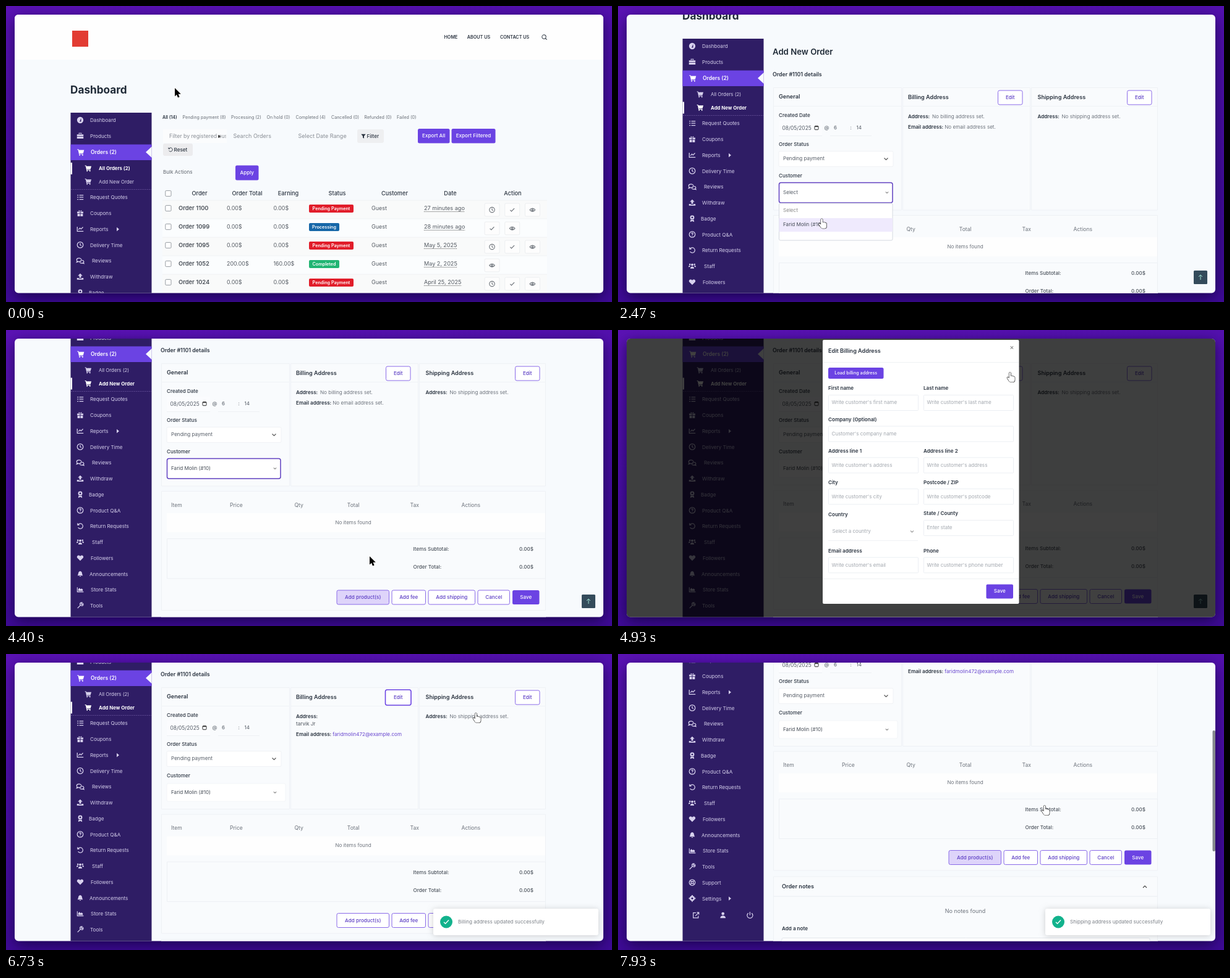
Animation, 980 px wide and 480 px high, one loop 8 s. Source, as an HTML page with a canvas:

```html
<!DOCTYPE html>
<html lang="en">
<head>
<meta charset="utf-8">
<title>Add new order</title>
<style>
html, body { margin: 0; width: 100%; height: 100%; overflow: hidden; background: #4a0ea3; }
canvas { display: block; width: 980px; height: 480px; }
</style>
</head>
<body>
<canvas id="stage" width="980" height="480"></canvas>
<script>
const ctx = document.getElementById('stage').getContext('2d');
const LOOP = 8000;
const PURPLE = '#6b43e3', NAVY = '#2f1d65', INK = '#2b3440', GREY = '#6d737c', PAGE = '#f7fafd';
const CUSTOMER = 'Farid Molin (#10)', FIRST = 'tarvik', EMAIL = 'faridmolin472@example.com';

// Time tracks: [time, value...]
const cursorKeys = [[0, 273, 133], [520, 180, 284], [1150, 180, 284], [1400, 227, 260], [1750, 345, 380],
  [2080, 352, 303], [2250, 352, 303], [2550, 325, 354], [3000, 325, 354], [3400, 390, 268], [3900, 575, 410],
  [4000, 575, 410], [4280, 577, 430], [4400, 588, 367], [4720, 634, 69], [4950, 634, 69], [5200, 385, 69],
  [5400, 385, 69], [5640, 620, 417], [6280, 620, 417], [6730, 760, 96], [6880, 843, 69], [7000, 843, 69],
  [7180, 385, 69], [7270, 385, 69], [7430, 620, 417], [7690, 620, 417], [7930, 690, 246], [8000, 690, 240]];
const scrollKeys = [[0, 0], [1650, 0], [1950, 120], [3020, 120], [3400, 218], [4000, 218], [4250, 198],
  [7700, 198], [7930, 300]];
const handTimes = [[380, 1500], [2400, 3000], [3850, 4340], [4680, 5000], [5130, 5450], [5580, 8000]];
const hoverTimes = [[3850, 4450], [6100, 6380], [7600, 8000]];

const within = (t, ranges) => ranges.some(([a, b]) => t >= a && t < b);

function track(keys, t) {
  let i = 0;
  while (i < keys.length - 1 && keys[i + 1][0] <= t) i++;
  const a = keys[i], b = keys[i + 1];
  if (!b || t <= a[0]) return a.slice(1);
  const p = (t - a[0]) / (b[0] - a[0]), e = p * p * (3 - 2 * p);
  return a.slice(1).map((v, k) => v + (b[k + 1] - v) * e);
}

function text(str, x, y, { size = 8.1, color = INK, weight = 400, align = 'left' } = {}) {
  ctx.font = `${weight} ${size}px Inter, sans-serif`;
  ctx.textAlign = align;
  ctx.textBaseline = 'middle';
  ctx.fillStyle = color;
  ctx.fillText(str, x, y);
}

function box(x, y, w, h, fill, stroke, r = 0, lw = 1) {
  ctx.beginPath();
  ctx.roundRect(x, y, w, h, r);
  if (fill) { ctx.fillStyle = fill; ctx.fill(); }
  if (stroke) { ctx.strokeStyle = stroke; ctx.lineWidth = lw; ctx.stroke(); }
}

function stroke(points, color, lw = 1) {
  ctx.beginPath();
  points.forEach(([x, y]) => ctx.lineTo(x, y));
  ctx.strokeStyle = color;
  ctx.lineWidth = lw;
  ctx.stroke();
}

const rule = (x1, x2, y, color = '#e9edf2') => stroke([[x1, y], [x2, y]], color);
const chevron = (x, y, s = 2.6, color = '#555', dir = 1) =>
  stroke([[x - s, y - dir * s / 2], [x, y + dir * s / 2], [x + s, y - dir * s / 2]], color, 1.1);

function shape(points, fill) {
  ctx.beginPath();
  points.forEach(([x, y]) => ctx.lineTo(x, y));
  ctx.closePath();
  ctx.fillStyle = fill;
  ctx.fill();
}

function button(label, x, y, w, h, { solid = true, hot = false, ring = false, size = 8.1 } = {}) {
  const fill = solid ? PURPLE : hot ? '#ded4fa' : '#fff';
  if (ring) box(x - 1, y - 1, w + 2, h + 2, fill, PURPLE, 3, 1.6);
  else box(x, y, w, h, fill, solid ? null : '#8a6be8', 2.5);
  text(label, x + w / 2, y + h / 2 + .3, { size, color: solid ? '#fff' : '#5d3fc4', weight: 500, align: 'center' });
}

// Icons live in a box of about 12 units; "s" is stroked, "f" is filled.
const circle = (x, y, r) => `M${x - r} ${y}a${r} ${r} 0 1 0 ${2 * r} 0a${r} ${r} 0 1 0 ${-2 * r} 0z`;
const icons = {
  gauge: ['f', circle(0, 0, 5.4) + 'M-1 2.5L1.5-3.5 1.6 2.5z'],
  bag: ['f', 'M-5.5-2.5h11v3h-11zM-5.5 1.3h11v3.4h-11zM-2.5-3v-2h5v2h-1v-1h-3v1z'],
  cart: ['f', 'M-6-5h2.2l.4 1.4h9L4 2H-2.2l.2.8h6v1h-7L-4.7-4H-6z' + circle(-2, 5, 1) + circle(3, 5, 1)],
  list: ['s', 'M-5-3.5h2M-1.5-3.5h7M-5 0h2M-1.5 0h7M-5 3.5h2M-1.5 3.5h7'],
  gift: ['f', 'M-5.2-2.5h4.7V.2h-4.7zM.5-2.5h4.7V.2H.5zM-4.6 1h4.1v4.2h-4.1zM.5 1h4.1v4.2H.5zM0-3C-5-3-2-7 0-3 2-7 5-3 0-3z'],
  chart: ['s', 'M-5-4v8H5.5M-3 1l2.5-2.6 2 1.6L4.8-3.4'],
  clock: ['s', circle(0, 0, 5) + 'M0-3V0l2 1.4'],
  chat: ['s', 'M-6-1.5a4 3 0 1 1 8 0a4 3 0 1 1-8 0M3.2-.8c4 .6 3 3.4 2.2 3.9l.9 1.6-2.6-.7C1 4.5-.3 3.4-.8 2.5M-5 .5l-1 2 2.6-.9'],
  upload: ['f', 'M0-5.5l4 4H1.5V2h-3v-3.5H-4zM-5.5 2.2h3v1h5v-1h3V5h-11z'],
  badge: ['f', circle(0, -1.8, 3.6) + circle(0, -1.8, 1.5) + 'M-2.6 2l-.8 3.8L0 4.4l3.4 1.4L2.6 2 0 2.6z'],
  help: ['s', circle(0, 0, 5) + 'M-1.4-1.3c.2-2 3-1.6 2.7.2C1.1 0 0 0 0 1.3M0 2.5v.8'],
  undo: ['s', 'M-3.6-2.4a4.4 4.4 0 1 1 0 4.6M-4.4-5v3h3'],
  staff: ['f', circle(0, -2.4, 2) + circle(-4, -3, 1.4) + circle(4, -3, 1.4) + 'M-3.2 4.2C-3.2-.4 3.2-.4 3.2 4.2zM-6.3 1.5c0-3 2.6-3 3-2.2l-1 2.2zM6.3 1.5c0-3-2.6-3-3-2.2l1 2.2z'],
  heart: ['f', 'M0 5L-5 0C-7-4-2-6 0-2.8 2-6 7-4 5 0z'],
  bell: ['f', 'M-4.6 3c2-2 .6-7 4.6-7.6C4-4 2.6 1 4.6 3zM-1.3 3.8h2.6c-.3 1.6-2.3 1.6-2.6 0z'],
  area: ['f', 'M-5.5-4h1.2v7.2h10v1.2H-5.5zM-3.4 2.3v-3l2-2.3 2 2 1.8-1 2 1.6v2.7z'],
  wrench: ['s', 'M-4.5 4.5L.8-.8M4.8-3.4l-1.7 1.6-1.5-1.5L3.3-5C-.6-6-1.6-1.4.8-.8 3 1.5 6 0 4.8-3.4z'],
  ring: ['s', circle(0, 0, 5) + circle(0, 0, 2) + 'M-3.5-3.5l2 2M3.5-3.5l-2 2M-3.5 3.5l2-2M3.5 3.5l-2-2'],
  gear: ['f', circle(0, 0, 4.2) + circle(0, 0, 1.7) + 'M-1.3-4h2.6l-.3-1.7h-2zM-1.3 4h2.6L1 5.7h-2zM-4-1.3v2.6L-5.7 1v-2zM4-1.3v2.6L5.7 1v-2z'],
  link: ['s', 'M0-4h-4.5v8.5h8.5V1M1.5-4.5H5V-1M5-4.5L-1 1.4'],
  user: ['f', circle(0, -2.6, 2.5) + 'M-4.6 5C-4.6-.6 4.6-.6 4.6 5z'],
  power: ['s', 'M-2.8-3.5a4.8 4.8 0 1 0 5.6 0M0-5.5V0'],
  eye: ['s', 'M-5 0C-2.5-4 2.5-4 5 0 2.5 4-2.5 4-5 0z' + circle(0, 0, 1.5)],
  check: ['s', 'M-4 .2l2.6 2.6L4-3'],
  search: ['s', circle(-.6, -.6, 4) + 'M2.3 2.3L5.3 5.3'],
  funnel: ['f', 'M-5-4.5H5L1.3 0v5L-1.3 3.4V0z']
};
for (const name in icons) icons[name][1] = new Path2D(icons[name][1]);

function icon(name, x, y, color = '#d8d2ee', scale = .95) {
  const [mode, path] = icons[name];
  ctx.save();
  ctx.translate(x, y);
  ctx.scale(scale, scale);
  ctx.lineWidth = 1.3;
  ctx.fillStyle = ctx.strokeStyle = color;
  if (mode === 's') ctx.stroke(path); else ctx.fill(path, 'evenodd');
  ctx.restore();
}

const menu = [['list', 'Request Quotes', 136], ['gift', 'Coupons', 136], ['chart', 'Reports', 136],
  ['clock', 'Delivery Time', 136], ['chat', 'Reviews', 139], ['upload', 'Withdraw', 136], ['badge', 'Badge', 134],
  ['help', 'Product Q&A', 136], ['undo', 'Return Requests', 136], ['staff', 'Staff', 139], ['heart', 'Followers', 137],
  ['bell', 'Announcements', 135], ['area', 'Store Stats', 137], ['wrench', 'Tools', 136], ['ring', 'Support', 136],
  ['gear', 'Settings', 136]];

function sidebar(adding) {
  const soft = '#d5cfeb';
  const arrow = y => shape([[179, y - 3.2], [183, y], [179, y + 3.2]], soft);
  box(104.5, 173, 131, 900, NAVY);
  icon('gauge', 120, 185);
  text('Dashboard', 136, 186, { color: soft });
  icon('bag', 120, 210.5);
  text('Products', 136, 211.5, { color: soft });
  box(104.5, 224.5, 131, 25.5, PURPLE);
  shape([[235.7, 228], [226, 237], [235.7, 246]], PAGE);
  icon('cart', 121, 237, '#fff');
  text('Orders (2)', 137, 237.3, { size: 8.5, color: '#fff', weight: 600 });
  [['All Orders (2)', 264, !adding], ['Add New Order', 285.5, adding]].forEach(([label, y, on]) => {
    icon('cart', 133, y - 1, on ? '#fff' : soft, .9);
    text(label, 150, y, { size: 7.8, color: on ? '#fff' : soft, weight: on ? 700 : 400 });
    if (on) box(104.5, y - 10, 2.5, 19, '#fff');
  });
  ctx.setLineDash([2, 1]);
  rule(105, 235, 297.5, '#5b468f');
  ctx.setLineDash([]);
  menu.forEach(([name, label, x], i) => {
    const y = 311 + i * 25.74;
    icon(name, 120, y - .8);
    text(label, x, y, { color: soft });
  });
  arrow(362);
  arrow(696.5);
  ['link', 'user', 'power'].forEach((name, i) => icon(name, 126 + i * 43.7, 723.5));
}

function header() {
  box(14, 0, 952, 87, '#fefefe');
  box(107, 40, 26, 26, '#e23c33');
  const nav = { size: 7.2, weight: 600 };
  text('HOME', 708.5, 50.5, nav);
  text('ABOUT US', 745.8, 50.5, nav);
  text('CONTACT US', 799, 50.5, nav);
  icon('search', 870.5, 50.5, '#303a45', .8);
  text('Dashboard', 104, 136.5, { size: 17.2, color: '#1f2a37', weight: 700 });
}

const tabs = [['All (14)', 253], ['Pending payment (8)', 285.5], ['Processing (2)', 364], ['On hold (0)', 421.5],
  ['Completed (4)', 468.5], ['Cancelled (0)', 526], ['Refunded (0)', 579.5], ['Failed (0)', 632]];
const columns = [['Order', 313], ['Order Total', 390], ['Earning', 456.5], ['Status', 535.5], ['Customer', 628.5],
  ['Date', 718.5], ['Action', 819.5]];
const statuses = { p: ['Pending Payment', 72, '#e11d2a'], r: ['Processing', 49, '#1667a8'], c: ['Completed', 49, '#22b573'] };
const orders = [[1100, '0.00$', '0.00$', 'p', '27 minutes ago'], [1099, '0.00$', '0.00$', 'r', '28 minutes ago'],
  [1095, '0.00$', '0.00$', 'p', 'May 5, 2025'], [1052, '200.00$', '160.00$', 'c', 'May 2, 2025'],
  [1024, '0.00$', '0.00$', 'p', 'April 25, 2025']];
const actions = { p: ['clock', 'check', 'eye'], r: ['check', 'eye'], c: ['eye'] };

function ordersPage() {
  tabs.forEach(([label, x], i) =>
    text(label, x, 181.3, { size: 7.1, color: i ? '#666c74' : INK, weight: i ? 400 : 600 }));
  const hint = { size: 9, color: '#888d94' };
  box(254, 200, 103, 22, '#fbfcfd');
  ctx.save();
  ctx.beginPath();
  ctx.rect(254, 200, 102, 22);
  ctx.clip();
  text('Filter by registered customer', 264, 211.3, { ...hint, size: 8.7 });
  ctx.restore();
  shape([[343, 209], [348, 211.5], [343, 214]], '#444');
  text('Search Orders', 367.5, 211.3, hint);
  text('Select Date Range', 472.5, 211.3, hint);
  box(568, 200, 43, 22, '#eeeff1', null, 3);
  icon('funnel', 578, 211, INK, .75);
  text('Filter', 583.5, 211.3, { weight: 500 });
  box(254, 223, 48, 20, '#ececee', null, 3);
  icon('undo', 266, 233, INK, .7);
  text('Reset', 271.5, 233.5, { weight: 500 });
  button('Export All', 666, 199, 51.5, 23.5);
  button('Export Filtered', 720.5, 199, 71, 23.5);
  text('Bulk Actions', 254, 269.5, { color: '#5f656d' });
  button('Apply', 371, 258.5, 37.5, 24);

  columns.forEach(([label, x]) => text(label, x, 304, { size: 9.2, weight: 500, align: 'center' }));
  const check = y => box(257.8, y - 4.6, 9.2, 9.2, '#fff', '#8d9299', 1.5, .9);
  check(304);
  orders.forEach(([id, total, earn, state, date], i) => {
    const y = 328 + i * 30;
    box(253, y - 13, 622, 30, i % 2 ? '#fbfdfe' : '#f9fafa');
    rule(253, 875, y - 13, '#f0f2f4');
    check(y);
    text(`Order ${id}`, 279, y, { size: 9.4, weight: 600, color: '#4a5058' });
    text(total, 357, y, { size: 8.9, color: '#555b63' });
    text(earn, 432.5, y, { size: 8.9, color: '#555b63' });
    const [label, w, color] = statuses[state];
    box(490, y - 6, w, 13, color, null, 2);
    text(label, 490 + w / 2, y + .8, { size: 7.2, color: '#fff', weight: 600, align: 'center' });
    text('Guest', 591, y, { size: 9, color: '#555b63' });
    text(date, 676, y, { size: 9.1, color: '#555b63' });
    const end = 676 + ctx.measureText(date).width;
    ctx.setLineDash([1, 1]);
    rule(676, end, y + 5.5, '#555');
    ctx.setLineDash([]);
    actions[state].forEach((name, k) => {
      box(774 + k * 32.7, y - 8, 24, 21, '#fdfdfd', '#eceef0', 2);
      icon(name, 786 + k * 32.7, y + 2.6, '#6b7178', .85);
    });
  });
}

function address(label, x, empty, name) {
  const w = 37.5;
  text(label + ':', x, 300, { weight: 600 });
  if (name) text(name + ' Jr', x, 312, { color: '#4b525b' });
  else text(empty, x + w + 1.5, 300, { color: GREY });
}

function orderForm(s) {
  text('Add New Order', 250, 195.3, { size: 13.2, weight: 600, color: '#1f2a37' });
  text('Order #1101 details', 250, 231, { size: 8.8, weight: 600 });
  const grow = s.focus ? 1.5 : 0;
  const head = { size: 9.1, weight: 600 }, label = { weight: 500 }, value = { color: '#555c66' };
  [[251.5, 207], [460.5, 206], [668.5, 204]].forEach(([x, w]) => {
    box(x, 252.5, w, 197 + grow, '#f9fbfd', '#eef1f5');
    rule(x, x + w, 282.5, '#f0f3f6');
  });
  text('General', 260, 267.5, head);
  text('Created Date', 260, 297.3, label);
  box(260, 306, 70, 24, '#fbfcfe');
  text('08/05/2025', 265.5, 318, { ...value, size: 8.4 });
  box(318, 314.6, 6, 6, null, '#333', 1);
  rule(318, 324, 315.5, '#333');
  text('@', 333.5, 318, value);
  text('6', 349, 318, value);
  text(':', 375.5, 318, value);
  text('14', 385.5, 318, value);
  rule(260, 330, 330.5, '#eef1f4');
  rule(343, 410, 330.5, '#eef1f4');
  text('Order Status', 260, 345, label);
  box(260, 355.5, 185, 25, '#fff', '#f0f2f5', 2);
  text('Pending payment', 267, 368, value);
  chevron(433.5, 368, 3);
  text('Customer', 260, 395.3, label);
  if (s.focus) box(260.5, 406.5, 183.5, 32.5, '#fff', '#5f3fc0', 3, 1.5);
  else box(260, 408, 192, 29, '#fff', '#f3f5f8', 2);
  text(s.picked ? CUSTOMER : 'Select', 267, 422.4 + grow / 3, { color: s.picked ? '#444b55' : '#555c66' });
  chevron(435, 422.4, 2.2, '#888');

  text('Billing Address', 469, 268.3, head);
  text('Shipping Address', 678.5, 268.3, head);
  button('Edit', 614.5, 257, 39.5, 23, { solid: false, ring: s.editRing });
  button('Edit', 823.5, 257, 39.5, 23, { solid: false });
  address('Address', 469, 'No billing address set.', s.billed && FIRST);
  address('Address', 678.5, 'No shipping address set.', s.shipped && FIRST);
  const my = s.billed ? 328.4 : 316.6;
  text('Email address:', 469, my, { weight: 600 });
  const mx = 469 + ctx.measureText('Email address: ').width;
  text(s.billed ? EMAIL : 'No email address set.', mx, my, { color: s.billed ? '#6846cf' : GREY });

  ctx.save();
  ctx.translate(0, grow - 1.5);
  box(251.5, 459.5, 621, 193, '#f9fbfd', '#eef1f5');
  [['Item', 267], ['Price', 362], ['Qty', 466.5], ['Total', 551.8], ['Tax', 653.5], ['Actions', 736.5]]
    .forEach(([name, x]) => text(name, x, 482, { size: 8.6, color: GREY }));
  box(260, 495, 612, 31, '#fefefe');
  text('No items found', 561.5, 510.5, { color: GREY, align: 'center' });
  box(260.5, 536.5, 612, 64.5, '#f9fbfd', '#edf0f4');
  [['Items Subtotal:', 554], ['Order Total:', 583]].forEach(([name, y]) => {
    text(name, 658.5, y, { weight: 500, color: '#4b525b' });
    text('0.00$', 853, y, { weight: 500, align: 'right', color: '#4b525b' });
  });
  [['Add product(s)', 535, 84.5], ['Add fee', 624, 54.5], ['Add shipping', 683, 75.5], ['Cancel', 763, 51.5]]
    .forEach(([name, x, w], i) => button(name, x, 620, w, 23, { solid: false, hot: !i && s.hover }));
  button('Save', 819, 620, 43.5, 23);
  box(251.5, 662.5, 621, 330, '#f9fbfd', '#eef1f5');
  rule(252, 872, 694.5);
  text('Order notes', 265, 679, head);
  chevron(852, 679, 3, '#444', -1);
  text('No notes found', 561.5, 718.5, { size: 9, color: GREY, align: 'center' });
  text('Add a note', 265, 747, { weight: 600 });
  box(265, 762, 595, 50, '#fff', '#e3e7ec', 2);
  ctx.restore();

  if (s.open) {
    box(260.5, 440, 183.5, 60, '#fff', '#d5d9e0', 2);
    box(260.5, 464, 183.5, 22, '#efeafd');
    text('Select', 267, 452, { color: '#888' });
    text(CUSTOMER, 267, 475, { color: '#444b55' });
  }
}

function field(label, x, y, w, hint, value, tint) {
  text(label, x, y, { weight: 600 });
  box(x + .5, y + 10.5, w - 1, 25, tint ? '#e8eefa' : '#fff', tint ? '#dde5f3' : '#eceff3', 1);
  text(value || hint, x + 5.5, y + 23, { color: value ? '#3c434d' : '#a2a7ae' });
}

function modal(kind, filled, pressed) {
  const small = kind.toLowerCase(), L = 340, R = 494, half = 146;
  const your = what => `Write customer's ${what}`;
  box(14, 14, 952, 452, 'rgba(0,0,0,.75)');
  box(331, 16, 317.5, 428, '#fff', null, 2);
  text(`Edit ${kind} Address`, L, 34, { size: 9.1, weight: 600 });
  text('×', 637, 29, { size: 11, color: '#777', align: 'center' });
  rule(331, 648, 52.5, '#eff1f4');
  button(`Load ${small} address`, L, 61, 89.5, 18, { size: 7.2 });
  field('First name', L, 95, half, your('first name'), filled && FIRST, filled);
  field('Last name', R, 95, half, your('last name'), filled && 'Jr', filled);
  field('Company (Optional)', L, 145.5, 300, "Customer's company name");
  field('Address line 1', L, 196.4, half, your('address'));
  field('Address line 2', R, 196.4, half, your('address'));
  field('City', L, 247.2, half, your('city'));
  field('Postcode / ZIP', R, 247.2, half, your('postcode'));
  text('Country', L, 300, { weight: 600 });
  text('Select a country', 346.5, 326.7, { color: '#a2a7ae' });
  rule(340, 485, 341.5, '#f0f2f5');
  chevron(475.5, 326.7, 2.4, '#999');
  field('State / County', R, 298, half, 'Enter state');
  if (kind === 'Billing') field('Email address', L, 358.3, half, your('email'), filled && EMAIL);
  field('Phone', R, 358.3, half, your('phone number'));
  rule(331, 648, 403.5, '#eff1f4');
  if (pressed) box(594, 411, 46.5, 26, '#fff', '#7b5be0', 3, 1.5);
  box(595.5, 412.5, 43.5, 23, pressed ? '#5130b4' : PURPLE, null, 2);
  text('Save', 617.3, 424, { color: '#fff', weight: 500, align: 'center' });
}

function shadowBox(x, y, w, h, fill, r, blur, color, dy) {
  ctx.save();
  ctx.shadowColor = color;
  ctx.shadowBlur = blur;
  ctx.shadowOffsetY = dy;
  box(x, y, w, h, fill, null, r);
  ctx.restore();
}

function toast(message) {
  shadowBox(691, 413, 267, 43, '#fff', 3, 10, 'rgba(0,0,0,.18)', 1);
  shape([], '#fff');
  box(702, 424.5, 20, 20, '#12b28c', null, 10);
  icon('check', 712, 434.5, '#fff', 1);
  text(message, 731, 434.6, { color: '#7c8188' });
}

const arrowPath = new Path2D('M0 0V13.5L3 10.8 5 15.6 7.6 14.5 5.6 9.8H9.8z');
const handPath = new Path2D('M-1.5 1.2C-1.5-.6 1.2-.6 1.2 1.2V6c.4-1.2 2.2-.9 2.4.3.5-.8 2-.5 2.2.6.7-.6 1.9-.2 1.9 1V12c0 2-1.3 3.4-3.2 3.4H1C-.6 15.4-1.5 14-2.4 12.4L-4.6 9c-.6-1.3 1-2.1 1.9-1.1l1.2 1.3z');

function pointer(t) {
  const [x, y] = track(cursorKeys, t), hand = within(t, handTimes);
  const path = hand ? handPath : arrowPath;
  ctx.save();
  ctx.translate(x, y);
  ctx.lineJoin = 'round';
  ctx.lineWidth = hand ? 1.2 : 1.8;
  ctx.strokeStyle = hand ? '#111' : '#fff';
  ctx.fillStyle = hand ? '#fff' : '#000';
  ctx.stroke(path);
  ctx.fill(path);
  ctx.restore();
}

function backdrop() {
  const g = ctx.createLinearGradient(0, 0, 60, 480);
  g.addColorStop(0, '#5a12b4');
  g.addColorStop(.5, '#4a0ea6');
  g.addColorStop(1, '#3d0a94');
  ctx.fillStyle = g;
  ctx.fillRect(0, 0, 980, 480);
  shadowBox(14, 14, 952, 451.5, PAGE, 6, 22, 'rgba(10,0,50,.7)', 6);
}

function draw(t) {
  const [scroll] = track(scrollKeys, t);
  const adding = t >= 950;
  backdrop();
  ctx.save();
  ctx.beginPath();
  ctx.roundRect(14, 14, 952, 451.5, 6);
  ctx.clip();

  ctx.save();
  ctx.translate(0, -scroll);
  header();
  sidebar(adding);
  if (adding) {
    orderForm({
      focus: t >= 2150 && t < 4850, open: t >= 2200 && t < 2720, picked: t >= 2720,
      billed: t >= 6100, shipped: t >= 7600, editRing: t >= 6100 && t < 6950, hover: within(t, hoverTimes)
    });
  } else ordersPage();
  ctx.restore();

  if (Math.abs(scroll - track(scrollKeys, t - 150)[0]) > .5)
    box(961.5, 89 + (scroll - 218) * .427, 4.5, 196, '#85888d', null, 2);
  if (scroll > 100) {
    box(931, 429, 22, 22, '#344b5b', null, 1.5);
    stroke([[942, 444], [942, 436]], '#9fe0d2');
    stroke([[939, 439], [942, 436], [945, 439]], '#9fe0d2');
  }
  if (t >= 4900 && t < 6100) modal('Billing', t >= 5380, t >= 5640);
  if (t >= 6980 && t < 7600) modal('Shipping', t >= 7270, t >= 7430);
  if (t >= 6250 && t < 6980) toast('Billing address updated successfully');
  if (t >= 7650) toast('Shipping address updated successfully');
  if (t >= 400 && t < 1500) {
    box(14, 451, 190.5, 15, '#3b3c40', null, [0, 3, 0, 0]);
    text('https://shop.supermythic.com/dashboard/orders/', 15, 458.8, { size: 7.8, color: '#c9cbd0' });
  }
  ctx.restore();
  pointer(t);
}

function frame() {
  draw(performance.now() % LOOP);
  requestAnimationFrame(frame);
}
frame();
</script>
</body>
</html>
```
